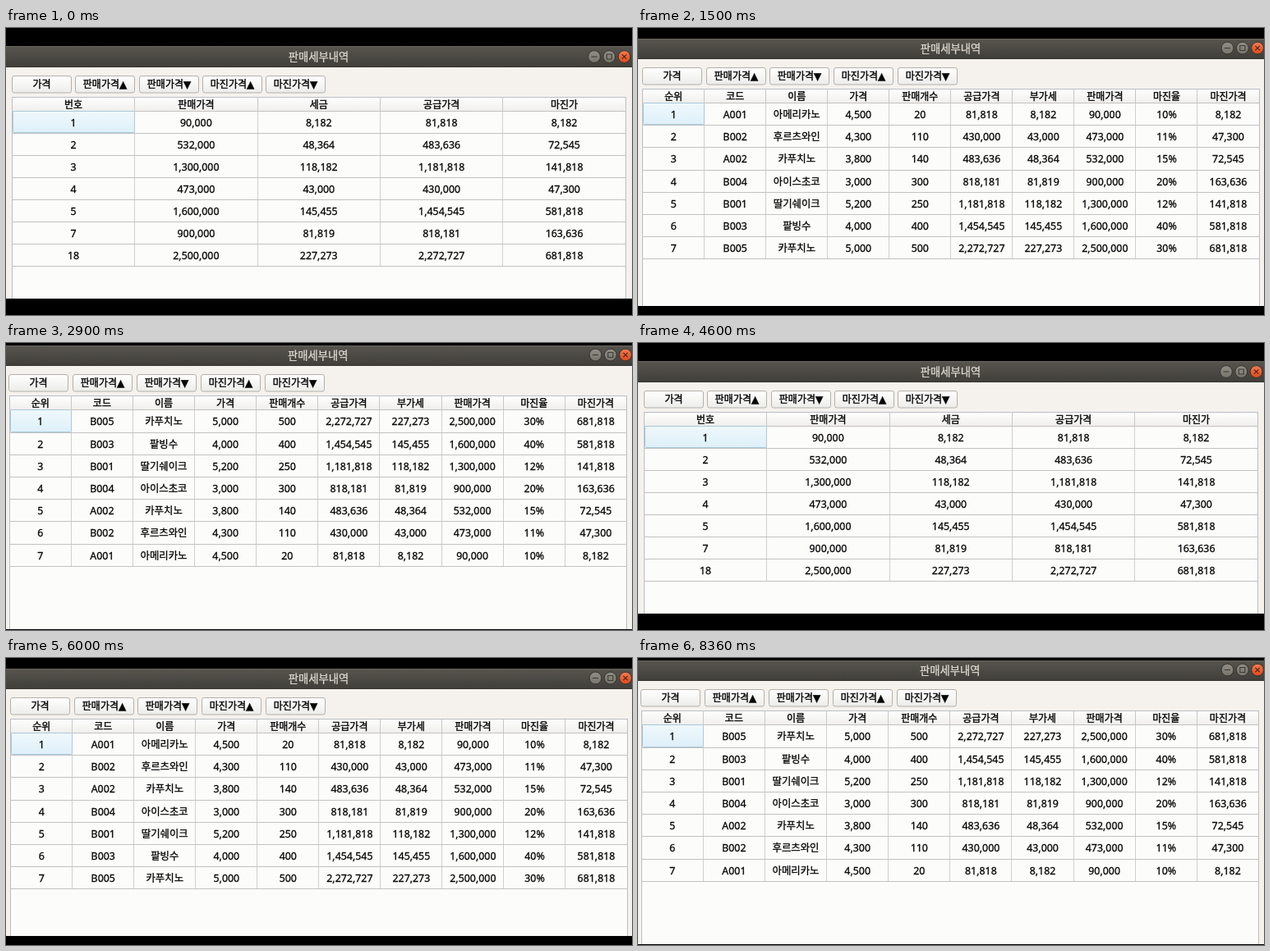
Write an HTML page that moves like this. It is 762x350 px and loops after 9 s.

```html
<!DOCTYPE html>
<html lang="ko">
<head>
<meta charset="utf-8">
<title>판매세부내역</title>
<style>
  html, body { margin: 0; width: 100%; height: 100%; overflow: hidden; background: #000; }
  svg { display: block; width: 762px; height: 350px; }
  text {
    font: 500 12px "Noto Sans CJK KR", "Noto Sans CJK", sans-serif;
    text-anchor: middle; fill: #080808; stroke: #080808; stroke-width: 0.4px;
  }
  .num { font: 500 12.4px "Noto Sans", "Noto Sans CJK KR", sans-serif; stroke-width: 0.3px; }
  .btn { font-family: "DejaVu Sans", "Noto Sans CJK KR", sans-serif; }
  .title { font-size: 13.3px; fill: #dfdbd2; stroke: #dfdbd2; stroke-width: 0.25px; }
</style>
</head>
<body>
<svg id="stage" viewBox="0 0 762 350">
  <defs>
    <linearGradient id="bar" x2="0" y2="1">
      <stop stop-color="#57554e"/><stop offset="1" stop-color="#403e39"/>
    </linearGradient>
    <linearGradient id="face" x2="0" y2="1">
      <stop stop-color="#ffffff"/><stop offset="1" stop-color="#ececea"/>
    </linearGradient>
    <linearGradient id="head" x2="0" y2="1">
      <stop stop-color="#fefefe"/><stop offset="1" stop-color="#efeeeb"/>
    </linearGradient>
    <linearGradient id="pick" x2="0" y2="1">
      <stop stop-color="#eff8fc"/><stop offset="1" stop-color="#def0f9"/>
    </linearGradient>
    <linearGradient id="grey" x2="0" y2="1">
      <stop stop-color="#918e85"/><stop offset="1" stop-color="#77746c"/>
    </linearGradient>
    <linearGradient id="red" x2="0" y2="1">
      <stop stop-color="#f37a52"/><stop offset="1" stop-color="#dd4a1c"/>
    </linearGradient>
  </defs>
</svg>
<script>
const NS = 'http://www.w3.org/2000/svg';
const stage = document.getElementById('stage');

// code, name, unit price, count, supply price, tax, margin rate, margin
const sales = [
  ['A001', '아메리카노', 4500, 20, 81818, 8182, 10, 8182],
  ['B002', '후르츠와인', 4300, 110, 430000, 43000, 11, 47300],
  ['A002', '카푸치노', 3800, 140, 483636, 48364, 15, 72545],
  ['B004', '아이스초코', 3000, 300, 818181, 81819, 20, 163636],
  ['B001', '딸기쉐이크', 5200, 250, 1181818, 118182, 12, 141818],
  ['B003', '팥빙수', 4000, 400, 1454545, 145455, 40, 581818],
  ['B005', '카푸치노', 5000, 500, 2272727, 227273, 30, 681818]
];
const ids = [1, 2, 3, 4, 5, 7, 18];
const buttons = ['가격', '판매가격▲', '판매가격▼', '마진가격▲', '마진가격▼'];
const shortHead = ['번호', '판매가격', '세금', '공급가격', '마진가'];
const fullHead = ['순위', '코드', '이름', '가격', '판매개수', '공급가격', '부가세', '판매가격', '마진율', '마진가격'];

const fmt = n => n.toLocaleString('en-US');
const shortRow = ([, , , , supply, tax, , margin], i) =>
  [ids[i], ...[supply + tax, tax, supply, margin].map(fmt)];
const fullRow = ([code, name, price, count, supply, tax, rate, margin], i) =>
  [i + 1, code, name, fmt(price), count, fmt(supply), fmt(tax), fmt(supply + tax), rate + '%', fmt(margin)];

const byCode = [...sales].sort((a, b) => a[0] < b[0] ? -1 : 1);
const layouts = [
  { top: 22, bottom: 330, barH: 26, titleX: 380.5, ctrlX: 716, ctrlY: 35, btnX: 7.5, btnY: 58.5, pitch: 77.25,
    left: 7.3, right: 754.3, tableY: 84.5, rowH: 27, head: shortHead, rows: byCode.map(shortRow) },
  { top: 13, bottom: 339, barH: 25, titleX: 380.5, ctrlX: 717.5, ctrlY: 24.5, btnX: 5.5, btnY: 48.5, pitch: 77.65,
    left: 5.7, right: 756, tableY: 74.7, rowH: 27.1, head: fullHead, rows: sales.map(fullRow) },
  { top: 3, bottom: 349, barH: 25, titleX: 379.8, ctrlX: 717.5, ctrlY: 14.5, btnX: 3.5, btnY: 38.5, pitch: 77.9,
    left: 4.2, right: 755.5, tableY: 64.8, rowH: 27.2, head: fullHead, rows: [...sales].reverse().map(fullRow) }
];

function add(parent, tag, attrs, content) {
  const el = document.createElementNS(NS, tag);
  for (const key in attrs) el.setAttribute(key, attrs[key]);
  if (content !== undefined) el.textContent = content;
  parent.appendChild(el);
  return el;
}
const box = (g, x, y, width, height, fill, more) => add(g, 'rect', { x, y, width, height, fill, ...more });
const line = (g, d, stroke, width = 1) => add(g, 'path', { d, stroke, 'stroke-width': width, fill: 'none' });
const label = (g, x, y, content, cls = '') => add(g, 'text', { x, y, class: cls }, content);
const snap = v => Math.floor(v) + 0.5;

function drawBar(g, v) {
  box(g, 0, v.top, 762, v.barH, 'url(#bar)');
  line(g, `M0 ${v.top + 0.5}H762`, '#66645d');
  line(g, `M0 ${v.top + v.barH - 0.5}H762`, '#383631');
  label(g, v.titleX, v.ctrlY + 5, '판매세부내역', 'title');
  const marks = ['M-3.5 0H3.5', 'M-3 -3H3V3H-3Z', 'M-2.7 -2.7L2.7 2.7M2.7 -2.7L-2.7 2.7'];
  marks.forEach((d, i) => {
    const c = add(g, 'g', { transform: `translate(${v.ctrlX + i * 18.3} ${v.ctrlY})` });
    add(c, 'circle', { r: 7.4, fill: i < 2 ? 'url(#grey)' : 'url(#red)', stroke: '#34322e' });
    line(c, d, i < 2 ? '#3d3b36' : '#4a2114', 1.1);
  });
}

function drawTable(g, v) {
  const headH = 17;
  const y0 = v.tableY + headH;
  const colW = (v.right - v.left) / v.head.length;
  const colX = i => snap(v.left + i * colW);
  const rowY = i => snap(y0 + i * v.rowH);
  const top = snap(v.tableY);
  const x0 = colX(0);
  const x1 = snap(v.right);
  const end = rowY(v.rows.length);
  const mid = i => v.left + (i + 0.5) * colW;

  box(g, x0, top, x1 - x0, v.bottom - top + 4, '#fcfcfb', { stroke: '#b9bec6' });
  box(g, x0 + 0.5, top + 0.5, x1 - x0 - 1, headH, 'url(#head)');
  for (let i = 1; i < v.head.length; i++) {
    line(g, `M${colX(i)} ${top}V${rowY(0)}`, '#c9c7c4');
    line(g, `M${colX(i)} ${rowY(0)}V${end}`, '#d2cfcb');
  }
  for (let i = 0; i <= v.rows.length; i++) line(g, `M${x0} ${rowY(i)}H${x1}`, '#c3c2c0');
  box(g, x0 + 1, rowY(0), colX(1) - x0 - 1, rowY(1) - rowY(0) - 1, 'url(#pick)', { stroke: '#a9c9dc', rx: 1 });

  v.head.forEach((name, i) => label(g, mid(i), top + 13.6, name));
  v.rows.forEach((row, r) => row.forEach((cell, i) =>
    label(g, mid(i), rowY(r) + 18.4, cell, 'num')));
}

function drawView(v, n) {
  const clip = add(stage.querySelector('defs'), 'clipPath', { id: 'win' + n });
  box(clip, 0, v.top, 762, v.bottom - v.top);
  const g = add(stage, 'g', { 'clip-path': `url(#win${n})`, visibility: 'hidden' });
  box(g, 0, v.top, 762, v.bottom - v.top, '#f5f2ed');
  drawBar(g, v);
  buttons.forEach((name, i) => {
    const x = snap(v.btnX + i * v.pitch);
    box(g, x, v.btnY, 72, 20.5, 'url(#face)', { rx: 2.5, stroke: '#b3b0ab' });
    label(g, x + 36, v.btnY + 14.7, name, 'btn');
  });
  drawTable(g, v);
  return g;
}

const views = layouts.map(drawView);
const cuts = [1500, 2900, 4600, 6000, 7400];

function update(ms) {
  const t = ms % 9000;
  const shown = cuts.filter(c => t >= c).length % views.length;
  views.forEach((g, i) => g.setAttribute('visibility', i === shown ? 'visible' : 'hidden'));
}

const start = performance.now();
function tick() {
  update(performance.now() - start);
  requestAnimationFrame(tick);
}
tick();
</script>
</body>
</html>
```
